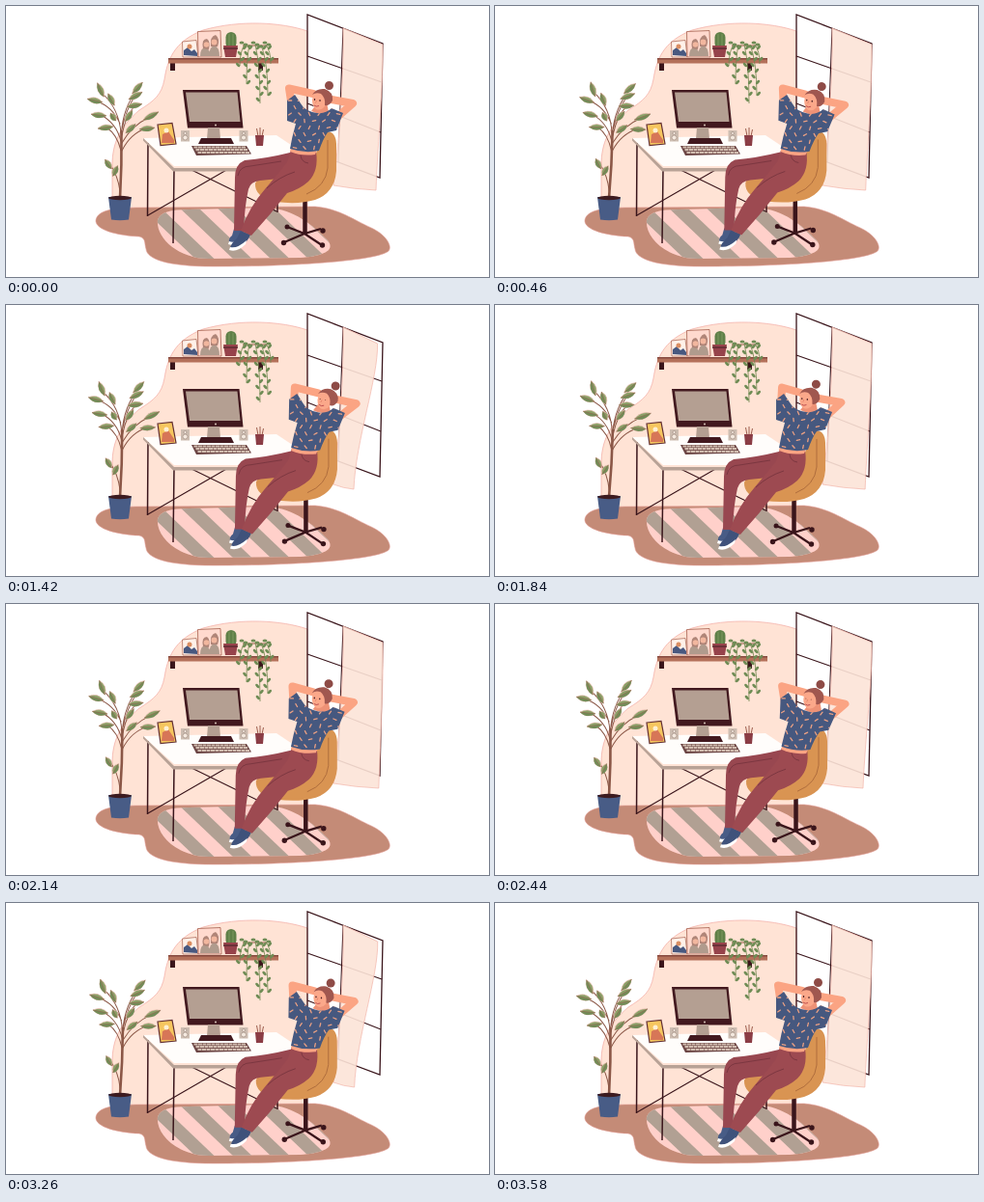
Animation, 500 px wide and 281 px high, one loop 3600 ms. Source, as an HTML page:

```html
<!DOCTYPE html>
<html lang="en">
<head>
<meta charset="utf-8">
<title>Desk break</title>
<style>
html, body { margin: 0; width: 100%; height: 100%; overflow: hidden; background: #fff; }
svg { display: block; width: 100vw; height: 100vh; }
.dark { stroke: #3a151b; fill: none; }
.skin { stroke: #fba483; fill: none; stroke-linecap: round; stroke-linejoin: round; }
</style>
</head>
<body>
<svg viewBox="0 0 500 281" preserveAspectRatio="none">
  <defs>
    <clipPath id="rugClip"><path d="M157 222C159 214 170 211 190 211L270 209C300 211 318 228 333 243C341 253 330 259 305 261L210 262C178 262 155 240 157 222Z"/></clipPath>
    <clipPath id="shirtClip"><path id="shirt" d="M299 92L291 98L291 119L300 122Q296 136 294 148Q309 153 324 150Q328 138 333 131L342 129L349 111L337 106Q331 112 322 111Q309 109 305 101Z"/></clipPath>
  </defs>

  <!-- room -->
  <path d="M110 212V165C110 142 118 125 138 108C154 98 161 92 164 76C167 57 173 37 204 25C243 14 286 17 312 26V212Z" fill="#ffe3d5" stroke="#f2aaa2" stroke-width=".7"/>
  <path d="M93 222C95 212 110 209 140 209L320 208C345 210 360 222 378 230C395 238 400 250 396 254C385 264 300 270 215 270C165 270 146 262 145 252C143 245 145 241 138 239C115 238 92 232 93 222Z" fill="#c48b77" stroke="#e29a93" stroke-width=".6"/>
  <g clip-path="url(#rugClip)">
    <path d="M150 205H345V270H150Z" fill="#ffd0ca"/>
    <g id="stripes" stroke="#b1a093" stroke-width="13.500"></g>
  </g>

  <!-- window -->
  <g class="dark" stroke-width="1.300">
    <path d="M312 150V9L390 39L387 178L312 150"/>
    <path d="M312 52L389 79M312 101L388 131M349 23L344 162" stroke-width="1.100"/>
  </g>
  <path id="curtain" fill="#fce4d7" fill-opacity=".9" stroke="#f3b5a9" stroke-width=".7"/>

  <!-- shelf -->
  <path d="M170 58h5v9h-5zM261 58h5v9h-5z" fill="#3a151b"/>
  <path d="M168 54H282V59.500H168Z" fill="#b4715a"/>
  <path d="M168 54H282V55.500H168Z" fill="#86493e"/>
  <path d="M182.500 37L197 35.500L199 53H183Z" fill="#fff1e9" stroke="#a5604f" stroke-width=".7"/>
  <path d="M184 51V46L188 43L192 47L195 45L198 49V52Z" fill="#48587f"/>
  <circle cx="190" cy="42" r="2.500" fill="#d98d62"/>
  <path d="M198.500 26.500L222 25.500L223 53H199Z" fill="#ffd9ce" stroke="#a5604f" stroke-width=".8"/>
  <path d="M201 52Q201 43 207 43Q211 45 212 52ZM210 52Q211 41 216 41Q221 43 221 52Z" fill="#b09b8d"/>
  <path d="M204 44Q202 34 208 34Q212 37 210 45ZM212 42Q211 31 217 30Q222 34 219 42Z" fill="#b08578"/>
  <circle cx="207.500" cy="40" r="2.800" fill="#f2b79f"/><circle cx="215.500" cy="37.500" r="3" fill="#f2b79f"/>
  <rect x="227.500" y="27" width="11" height="17" rx="5.500" fill="#5f8048"/>
  <path d="M231 29V41M235 29V41" stroke="#83a065" stroke-width=".8"/>
  <path d="M225 41H240L238 53H227Z" fill="#96434b"/>
  <path d="M225 44H240" stroke="#5e2930" stroke-width="1.500"/>
  <path d="M245 41H270" stroke="#9d5d4d"/>
  <g id="vines" fill="#6f8c55"></g>

  <!-- desk -->
  <g class="dark" stroke-width="1.500">
    <path d="M147 142L146.500 218M174 170L173 246M281 160V214"/>
    <path d="M147 217L230 169M190 169L280 213" stroke-width="1.100"/>
  </g>
  <path d="M142 137L280 134L298 146L300 166H174Z" fill="#fffdfb"/>
  <path d="M142 137L174 168H292V171.500H173L142 139.500Z" fill="#b8a296"/>
  <path d="M157 123L172 121.500L176 143L160 144.500Z" fill="#f6c65f" stroke="#633034" stroke-width="1.200"/>
  <path d="M161 142L162 133L168 130L174 139V142Z" fill="#d77657"/>
  <circle cx="166" cy="129" r="2.500" fill="#fff0d2"/>
  <g id="speakers"></g>
  <path d="M183 87H241.500L245.500 126.500H188Z" fill="#42191f"/>
  <path d="M186 89.500H239.500L242.500 120H190Z" fill="#b49f92"/>
  <path d="M209 126H221L222 138H208Z" fill="#b49f92"/>
  <path d="M202 137H233L236 143H199Z" fill="#42191f"/>
  <circle cx="217" cy="123.500" r="1" fill="#d9c5b9"/>
  <path d="M192 145H249L254 153.500L197 155Z" fill="#6b4443"/>
  <path d="M194.500 146.500H248M196.500 149.200H250M198.500 152H252" stroke="#d0bbae" stroke-width="2.200" stroke-dasharray="4 .5"/>
  <path d="M261 135L259.500 127M263 135V126M265 135L266.500 128" stroke="#9d5d4d"/>
  <path d="M258 134H267L266 145H259Z" fill="#8b3d45"/>

  <!-- potted tree -->
  <g id="tree">
    <g fill="none" stroke="#8b5747" stroke-linecap="round">
      <path d="M118 200Q120 165 119.500 130" stroke-width="2.600"/>
      <path d="M119 132Q117 106 99 90M118 122Q110 104 94 99M119 140Q114 121 98 113M119 150Q115 133 104 126M119.500 132Q121 105 136 87M120 128Q124 108 133 94M120 134Q124 113 133 104M120 142Q130 124 149 115M120 150Q129 132 145 127M118 192Q116 176 107 163" stroke-width="1"/>
    </g>
    <g id="leaves"></g>
  </g>
  <path d="M106 198H130L127 221.500Q118 223 109 221.500Z" fill="#485c86"/>
  <ellipse cx="118" cy="199" rx="12" ry="2.200" fill="#3d1b20"/>

  <!-- chair and woman -->
  <g id="chair">
    <path class="dark" d="M309.500 200V237" stroke-width="4.500"/>
    <path class="dark" d="M288 245L309 236L327 248M291 229L309 236L326 231" stroke-width="2.300"/>
    <g fill="#3a151b"><circle cx="287.500" cy="245.500" r="2.700"/><circle cx="327.500" cy="248" r="2.700"/><circle cx="291" cy="229" r="2.500"/><circle cx="328" cy="233" r="2.700"/></g>
    <path d="M327 132Q341 126 342 143V171Q340 194 320 201Q303 206 279 203Q257 198 258 184Q260 176 279 178L316 170Z" fill="#d99452"/>
    <path d="M333 139V168Q331 187 311 195" fill="none" stroke="#af6d3d"/>
  </g>
  <g id="legs">
    <path d="M236 231H247L242 243Q236 247 231 245Q230 241 234 238Z" fill="#485c86"/>
    <path d="M231 244Q236 246 242 242L241 245Q235 249 230 247Z" fill="#fff"/>
    <path d="M294 152Q270 158 247 160Q237 164 237 178L236 233L246 233Q247 207 251 190Q253 182 263 181Q283 179 301 177Z" fill="#984750"/>
    <path d="M243 233L253 237Q250 245 243 249Q237 253 232 251Q233 246 239 241Z" fill="#3f527b"/>
    <path d="M232 250Q239 252 249 243L248 247Q239 256 231 253Z" fill="#fff"/>
    <path d="M295 149Q309 154 321 151Q324 171 313 182Q304 190 291 194Q274 216 254 238L243 233Q252 208 268 190Q280 176 291 162Z" fill="#9d4a51"/>
    <path d="M240 176Q242 166 253 166L285 161M305 155Q306 162 313 163M270 189Q283 177 299 172" fill="none" stroke="#74333d" stroke-width=".8"/>
  </g>
  <g id="body">
    <path id="armR" class="skin" stroke-width="8"/>
    <path id="armL" class="skin" stroke-width="8"/>
    <path d="M295 147L322 149L320 154Q306 156 294 151Z" fill="#fba483"/>
    <path d="M322 101L332 100L334 110Q326 114 316 109Z" fill="#ee9276"/>
    <use href="#shirt" fill="#46587f"/>
    <g id="dashes" clip-path="url(#shirtClip)" stroke="#eba083" stroke-width="1.300" stroke-linecap="round"></g>
    <g id="head">
      <circle cx="334.500" cy="82.500" r="4.500" fill="#8e4b46"/>
      <path d="M318 91Q322 87 328 89L332 97L330 104Q326 109 321 107Q317 104 317 98Z" fill="#fba88a"/>
      <path d="M317 92Q321 85 330 86Q339 89 338 98Q335 104 330 103Q331 95 326 91Q321 89 317 92Z" fill="#a0574f"/>
      <g id="eyes" fill="#42191f"><ellipse cx="319.500" cy="97" rx=".7" ry=".9"/><ellipse cx="325" cy="98" rx=".7" ry=".9"/></g>
      <path d="M319 103Q321 105 324 103.500" fill="none" stroke="#b9484c" stroke-width=".9"/>
      <path d="M321.500 98L320.500 100.500" stroke="#dd7b65" stroke-width=".7"/>
    </g>
  </g>
</svg>
<script>
const $ = id => document.getElementById(id);
const NS = 'http://www.w3.org/2000/svg';
const LOOP = 3600;

function add(parent, tag, attrs) {
  const el = parent.appendChild(document.createElementNS(NS, tag));
  for (const k in attrs) el.setAttribute(k, attrs[k]);
  return el;
}
const path = (parent, d, attrs = {}) => add(parent, 'path', { d, ...attrs });

let seed = 7;
const rand = () => (seed = (seed * 16807) % 2147483647) / 2147483647;

for (let x = 146; x < 340; x += 39) path($('stripes'), `M${x} 205L${x + 66} 268`);

for (const x of [181, 241.5]) {
  path($('speakers'), `M${x} 129H${x + 9}V140.500H${x}Z`, { fill: '#cdbdb1' });
  for (const [y, r] of [[132, 1.5], [136.5, 2.5]])
    add($('speakers'), 'circle', { cx: x + 4.5, cy: y, r, fill: '#f4e9df', stroke: '#a38f83', 'stroke-width': .7 });
}

// hanging vines: x at the top, x at the tip, length
for (const [a, b, len] of [[247, 242, 22], [252, 249, 41], [258, 263, 61], [264, 271, 53], [269, 274, 20]]) {
  path($('vines'), `M${a} 40Q${b} ${40 + len / 3} ${b} ${40 + len}`, { fill: 'none', stroke: '#70864f', 'stroke-width': .8 });
  for (let y = 3, side = 1; y <= len; y += 6, side = -side) {
    const x = a + (b - a) * Math.sqrt(y / len) + side * 2;
    add($('vines'), 'ellipse', { rx: 2.8, ry: 1.4, transform: `translate(${x} ${40 + y}) rotate(${side * -48})` });
  }
}
for (let i = 0; i < 8; i++)
  add($('vines'), 'ellipse', { cx: 244 + i * 4, cy: 38 + i % 3 * 2, rx: 2.5, ry: 1.5 });

// tree leaves: x, y, angle, half length
const leaves = [
  [98, 87, 65, 8], [92, 98, 12, 8], [96, 113, 6, 8], [103, 126, -8, 8], [109, 97, 62, 7], [111, 115, 55, 5],
  [136, 85, -48, 8], [134, 93, -28, 8], [133, 103, -10, 8], [127, 114, -57, 7], [150, 114, -28, 9],
  [146, 127, -6, 8], [129, 127, -42, 7], [106, 164, 55, 6], [113, 171, -65, 6]
].map(([x, y, a, r]) => {
  const g = add($('leaves'), 'g', {});
  path(g, `M${-r} 0Q0 -6 ${r} 0Q0 6 ${-r} 0Z`, { fill: '#8aa168', stroke: '#efbdb4', 'stroke-width': .6 });
  path(g, `M${-r} 0Q0 6 ${r} 0Z`, { fill: '#728c58' });
  path(g, `M${-r} 0H${r}`, { stroke: '#92674e', 'stroke-width': .6 });
  return { g, x, y, a };
});

for (let y = 98, row = 0; y < 149; y += 7, row++)
  for (let x = 294 + row % 2 * 5; x < 350; x += 10) {
    const a = rand() * Math.PI, dx = 1.7 * Math.cos(a), dy = 1.7 * Math.sin(a);
    path($('dashes'), `M${x - dx} ${y - dy}L${x + dx} ${y + dy}`);
  }

// smooth interpolation through [time, value] pairs
function track(keys, t) {
  const i = Math.max(1, keys.findIndex(k => k[0] >= t));
  const [t0, a] = keys[i - 1], [t1, b] = keys[i];
  const u = (t - t0) / (t1 - t0);
  return a + (b - a) * (1 - Math.cos(Math.PI * u)) / 2;
}
const swing = (t, period) => (1 - Math.cos(2 * Math.PI * t / period)) / 2;

const curtainKeys = [[0, 383], [300, 386], [640, 381], [900, 366], [1170, 354.5], [1420, 360], [1800, 383]];
const elbowKeys = [[0, 0], [900, 3], [1420, 3.5], [1840, 4], [2440, -1], [2940, 3], [3600, 0]];
const headKeys = [[0, 0], [900, .5], [1420, 3], [1840, -1.5], [2440, -2], [2940, -.5], [3600, 0]];
const move = (id, value) => $(id).setAttribute('transform', value);

function draw(now) {
  const t = now % LOOP;
  const lean = swing(t, 1800), sway = swing(t, 1200);

  move('chair', `translate(${2.5 * lean} ${-lean})`);
  move('legs', `translate(${2.5 * lean} ${-lean})`);
  move('body', `translate(${2.7 * lean} ${.5 * lean}) rotate(${3 * lean} 308 155)`);

  const h = track(headKeys, t), e = track(elbowKeys, t);
  move('head', `translate(${h} 0) rotate(${h} 322 106)`);
  $('armL').setAttribute('d', `M296 105L${293 + e} 85.500L${318 + h} 91`);
  $('armR').setAttribute('d', `M342 116L${359 + h * .5} 101L${337 + h} 97`);
  const shut = (t > 1300 && t < 1600) || (t > 2300 && t < 2600);
  for (const eye of $('eyes').children) eye.setAttribute('ry', shut ? .3 : .9);

  move('tree', `rotate(${2 * sway} 119 199)`);
  for (const { g, x, y, a } of leaves)
    g.setAttribute('transform', `translate(${x} ${y}) rotate(${a + 7 * sway})`);

  const b = track(curtainKeys, t % 1800);
  const top = 383 + 7 * Math.min(1, (b - 354) / 27);
  $('curtain').setAttribute('d',
    `M349 23L${top} 40C${top + 1} 75 ${b + 2} 140 ${b} 191Q${(b + 338) / 2} 190 339 186C344 145 350 80 349 23Z`);
}

function tick() {
  draw(performance.now());
  requestAnimationFrame(tick);
}
tick();
</script>
</body>
</html>
```
